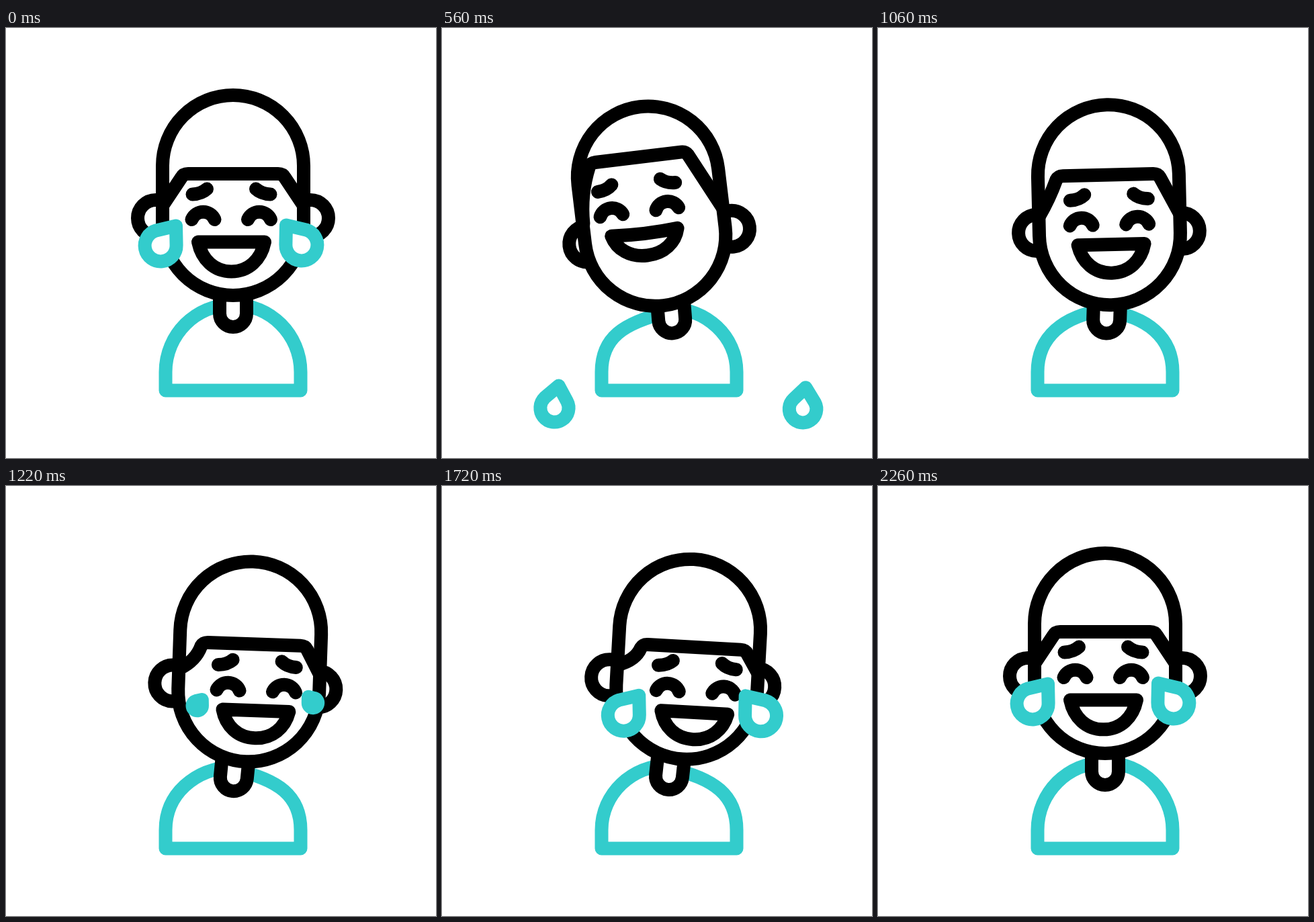
Recreate the animation shown at these times as an HTML page with a canvas. Size 640 by 640 pixels, loop 2400 ms.

```html
<!DOCTYPE html>
<html lang="en">
<head>
<meta charset="utf-8">
<title>Laughing to tears</title>
<style>
html, body { margin: 0; width: 100%; height: 100%; overflow: hidden; background: #fff; }
canvas { display: block; }
</style>
</head>
<body>
<canvas width="640" height="640"></canvas>
<script>
const ctx = document.querySelector('canvas').getContext('2d');
const LOOP = 2400, BLACK = '#000', CYAN = '#33cccc';

const rest = {
  head: [0, 0, 0], face: [0, 0], mouth: [0, 0], hair: [0, 0, 0], bow: [0, 0],
  earL: [-115, -10], earR: [115, -10], neck: [338, 425, 0],
  tearL: [-108, 31], tearR: [102, 30],
  shoulderL: [456.5, 282.5, 411.5, 411.5], shoulderR: [456.5, 282.5, 411.5, 411.5]
};
const left = {
  head: [-22, 17.4, -7.3], face: [-17.5, -31], mouth: [-13.5, -34.5], hair: [-9, -15, -45.5], bow: [-9, -3],
  earL: [-101, 1], earR: [114, 4.5], neck: [342.5, 435, -5],
  tearL: [-108, 31], tearR: [102, 30],
  shoulderL: [462, 267, 441, 423], shoulderR: [459, 282.5, 417.5, 417.5]
};
const right = {
  head: [33.5, 11.2, 4.1], face: [21, 16.5], mouth: [20.5, 11.5], hair: [7, 13, 17.5], bow: [12, 7],
  earL: [-116, -10], earR: [100.5, -9], neck: [338, 434, 8],
  tearL: [-87, 48.5], tearR: [115.5, 35],
  shoulderL: [459, 282.5, 416.5, 416.5], shoulderR: [462, 267, 441, 423]
};

const clamp = v => Math.min(1, Math.max(0, v));
const lerp = (a, b, u) => a + (b - a) * u;

// Cubic bezier easing with handles (.33, 0) and (x2, 1)
function ease(p, x2 = .38) {
  p = clamp(p);
  let lo = 0, hi = 1, s = .5;
  for (let i = 0; i < 24; i++) {
    s = (lo + hi) / 2;
    const x = 3 * s * (1 - s) * ((1 - s) * .33 + s * x2) + s ** 3;
    if (x < p) lo = s; else hi = s;
  }
  return s * s * (3 - 2 * s);
}

function keyed(t, keys) {
  const i = Math.max(1, keys.findIndex(k => k[0] >= t));
  const [t0, a] = keys[i - 1], [t1, b] = keys[i];
  return lerp(a, b, ease((t - t0) / (t1 - t0), .67));
}

function mix(a, b, u) {
  const out = {};
  for (const k in a) out[k] = a[k].map((v, i) => lerp(v, b[k][i], u));
  return out;
}

function poseAt(t) {
  if (t < 740) {
    const u = ease(t / 740), pose = mix(rest, left, u);
    pose.head[1] = left.head[1] * u ** 1.5;
    return pose;
  }
  if (t < 1560) return mix(left, right, ease((t - 740) / 820, .35));
  return mix(right, rest, ease((t - 1560) / 710, .28));
}

function draw(d, color = BLACK, fill) {
  const path = new Path2D(d);
  if (fill) { ctx.fillStyle = '#fff'; ctx.fill(path); }
  ctx.strokeStyle = color;
  ctx.stroke(path);
}

function at(x, y, degrees, paint) {
  ctx.save();
  ctx.translate(x, y);
  ctx.rotate(degrees * Math.PI / 180);
  paint();
  ctx.restore();
}

function tear(x, y, degrees, size, side) {
  const n = v => v * size, m = v => v * size * side;
  at(x, y, degrees, () => draw(
    `M${m(23)} ${n(-29.5)}L${m(23.6)} ${n(-.6)}A${n(23.5)} ${n(23.5)} 0 1 ${side > 0 ? 1 : 0} ${m(-6.6)} ${n(-22.6)}Z`,
    CYAN, true));
}

function body({ shoulderL: l, shoulderR: r }) {
  draw(`M338 ${r[3]}C${676 - r[1]} ${r[2]} 438.5 ${r[0]} 438.5 512V539.5H237.5V512
    C237.5 ${l[0]} ${l[1]} ${l[2]} 338 ${l[3]}`, CYAN);
}

function hair({ hair: [l, r, y], bow }) {
  const cx = -77 + l, cy = -70.5 + y, top = -76 + y;
  draw(`M-104 -30Q${(cx - 104) / 2 + bow[0]} ${(cy - 30) / 2 + bow[1]} ${cx} ${cy}
    Q${l - 74} ${top} ${l - 67} ${top}H${r + 67}Q${r + 74} ${top} ${r + 77} ${cy}L104 -30`);
}

function face(pose, t) {
  at(...pose.face, 0, () => {
    draw('M-61.5 -8a18.5 18.5 0 0 1 34 0M22 -8a18.5 18.5 0 0 1 34 0');
    draw('M-60.5 -45.5Q-47 -46 -39 -53.5M34 -53.5Q42 -46 55.5 -45.5');
  });
  const depth = keyed(t, [[0, 44], [340, 35], [740, 35], [1060, 42.5], [1500, 38], [2000, 43.5], [2400, 44]]);
  const sag = keyed(t, [[0, 0], [340, 10], [740, 0], [2400, 0]]);
  at(pose.mouth[0] - 2.5, pose.mouth[1] + 25.5, 0, () => draw(
    `M-49.5 0Q0 ${sag} 49.5 0C44 ${depth * .6} 25.5 ${depth} 0 ${depth}S-44 ${depth * .6} -49.5 0Z`, BLACK, true));
}

function tears(pose, t) {
  if (t < 900) {
    const q = ease(t / 900, .67), arc = q * (1 - q);
    tear(230 - 92 * q, 324 + 355 * q, -40 * q, 1 - .15 * q, 1);
    tear(440 + 135 * q + 24 * arc, 323 + 348 * q + 34 * arc, 67 * q, 1 - .2 * q, -1);
    return;
  }
  const size = ease((t - 1080) / 480);
  if (t <= 1080 || size < .005) return;
  const [dx, dy, deg] = pose.head, a = deg * Math.PI / 180;
  for (const [[x, y], side] of [[pose.tearL, 1], [pose.tearR, -1]]) {
    const shrink = 1 - size;
    tear(338 + dx + x * Math.cos(a) - y * Math.sin(a) + 23 * side * shrink,
      293 + dy + x * Math.sin(a) + y * Math.cos(a) - 29.5 * shrink, 0, size, side);
  }
}

function frame(now) {
  const t = now % LOOP, pose = poseAt(t), [dx, dy, angle] = pose.head;
  ctx.fillStyle = '#fff';
  ctx.fillRect(0, 0, 640, 640);
  ctx.lineWidth = 20;
  ctx.lineCap = ctx.lineJoin = 'round';

  body(pose);
  at(...pose.neck, () => draw('M-20 -32V0A20 20 0 0 0 20 0V-32', BLACK, true));
  at(338 + dx, 293 + dy, angle, () => {
    for (const [x, y] of [pose.earL, pose.earR])
      draw(`M${x - 27} ${y}a27 27 0 1 1 54 0a27 27 0 1 1 -54 0`, BLACK, true);
    draw('M-105 -88A105 105 0 0 1 105 -88V0A105 105 0 0 1 -105 0Z', BLACK, true);
    hair(pose);
    face(pose, t);
  });
  tears(pose, t);
  requestAnimationFrame(frame);
}
requestAnimationFrame(frame);
</script>
</body>
</html>
```
